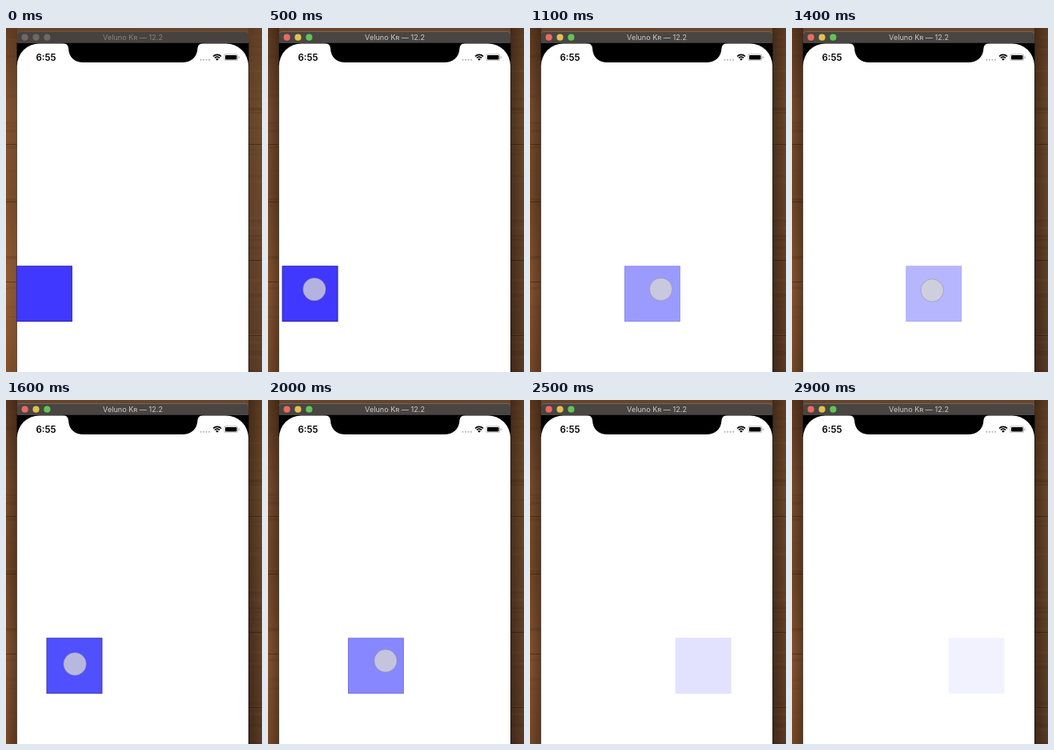
An HTML page with a canvas that plays this animation: 320x430 px, repeating every 3.6 s.

```html
<!DOCTYPE html>
<html lang="en">
<head>
<meta charset="utf-8">
<title>Drag to fade</title>
<style>
  html, body { margin: 0; width: 100%; height: 100%; overflow: hidden; }
  canvas { display: block; }
</style>
</head>
<body>
<canvas id="stage" width="320" height="430"></canvas>
<script>
const ctx = document.getElementById('stage').getContext('2d');
const LOOP = 3600, STEP = 100;
const TOUCH_START = 200, TOUCH_END = 2500;

// [time in ms, left edge of the square]
const path = [[0, 13], [300, 13], [600, 22], [900, 50.6], [1100, 118], [1260, 149],
  [1400, 142.3], [1500, 82], [1600, 50.6], [1740, 41], [1900, 63], [2000, 100],
  [2200, 162.3], [2400, 173], [2600, 189], [2900, 195.6], [3600, 195.6]];

const chord = i => i < 0 || i > path.length - 2 ? 0
  : (path[i + 1][1] - path[i][1]) / (path[i + 1][0] - path[i][0]);

function tangent(i) {
  const a = chord(i - 1), b = chord(i);
  return a * b <= 0 ? 0 : 2 * a * b / (a + b);
}

// Monotone cubic through the path points
function squareX(t) {
  t = Math.max(0, Math.min(LOOP - 1, t));
  const i = path.findIndex((p, k) => t < path[k + 1][0]);
  const [t0, x0] = path[i], [t1, x1] = path[i + 1];
  const h = t1 - t0, u = (t - t0) / h, v = 1 - u;
  return x0 * (1 + 2 * u) * v * v + x1 * u * u * (3 - 2 * u)
    + h * u * v * (tangent(i) * v - tangent(i + 1) * u);
}

function rect(x, y, w, h, color) {
  ctx.fillStyle = color;
  ctx.fillRect(x, y, w, h);
}

function disc(x, y, r, color) {
  ctx.fillStyle = color;
  ctx.beginPath();
  ctx.arc(x, y, r, 0, 7);
  ctx.fill();
}

function roundRect(x, y, w, h, r, color) {
  ctx.fillStyle = color;
  ctx.beginPath();
  ctx.roundRect(x, y, w, h, r);
  ctx.fill();
}

function text(str, x, y, font, color, align) {
  ctx.font = font;
  ctx.fillStyle = color;
  ctx.textAlign = align;
  ctx.fillText(str, x, y);
}

// Evenly spaced colour stops between two points
function gradient(x0, y0, x1, y1, colors) {
  const g = ctx.createLinearGradient(x0, y0, x1, y1);
  colors.forEach((color, i) => g.addColorStop(i / (colors.length - 1), color));
  return g;
}

function drawWood(active) {
  rect(0, 0, 160, 430, gradient(0, 0, 0, 430,
    ['#6a4226', '#8d5935', '#87542f', '#9c6339', '#8c5730']));
  rect(160, 0, 160, 430, gradient(0, 0, 0, 430,
    ['#6a4428', '#75502f', '#704b2f', '#6a462b', '#64412a']));

  let seed = 7;
  const random = () => (seed = seed * 16807 % 2147483647) / 2147483647;
  for (let i = 0; i < 70; i++) {
    const shade = random() < 0.6 ? '45,22,8' : '165,110,68';
    rect(random() < 0.5 ? 0 : 303, random() * 430, 17, 1 + random() * 3,
      `rgba(${shade},${0.03 + random() * 0.09})`);
  }
  for (const [x, y] of [[0, 145], [0, 217], [0, 317], [303, 145], [303, 290], [303, 384]]) {
    rect(x, y, 17, 1, 'rgba(40,20,8,.45)');
  }

  const depth = active ? 0.45 : 0.18;
  for (const [edge, far] of [[14, -10], [303, 327]]) {
    rect(Math.min(edge, far), 0, 24, 430, gradient(edge, 0, far, 0,
      [`rgba(20,10,4,${depth})`, 'rgba(20,10,4,0)']));
  }
}

function drawWindow(active) {
  rect(13.3, 18, 290.4, 412, '#1c1815');
  roundRect(14, 4, 289, 16, [4, 4, 0, 0], active ? '#6c6967' : '#5b5653');
  roundRect(14, 5, 289, 15, [4, 4, 0, 0], active ? '#484543' : '#48423f');
  const lights = active ? ['#ec6a5f', '#e3c04d', '#61c455'] : ['#6d6865', '#6d6865', '#6d6865'];
  lights.forEach((color, i) => disc(23.6 + 13.9 * i, 11.7, 4.1, color));
  text('Veluno Kʀ — 12.2', 158.5, 15.2, '9.1px Inter, sans-serif',
    active ? '#cbc8c6' : '#898481', 'center');
}

function drawScreen() {
  rect(14, 19, 289, 60, '#000');
  roundRect(13.8, 19.4, 289.2, 440, 28, '#fff');

  ctx.fillStyle = '#000';
  ctx.beginPath();
  ctx.moveTo(70, 18.8);
  ctx.quadraticCurveTo(77.5, 19.3, 78, 25);
  ctx.bezierCurveTo(78.5, 37, 86, 43, 97, 43);
  ctx.lineTo(220, 43);
  ctx.bezierCurveTo(231, 43, 239, 37, 239.5, 25);
  ctx.quadraticCurveTo(240, 19.3, 248, 18.8);
  ctx.fill();

  text('6:55', 37.5, 41, '600 11.5px Inter, sans-serif', '#000', 'left');
  for (let i = 0; i < 4; i++) disc(243.5 + 3.5 * i, 39.8, 1.1, '#b9b9b9');

  ctx.strokeStyle = '#000';
  ctx.lineWidth = 1.6;
  for (const r of [4.4, 7.1]) {
    ctx.beginPath();
    ctx.arc(264, 40.5, r, -Math.PI * 0.75, -Math.PI * 0.25);
    ctx.stroke();
  }
  ctx.beginPath();
  ctx.moveTo(264, 40.8);
  ctx.arc(264, 40.8, 2.7, -Math.PI * 0.75, -Math.PI * 0.25);
  ctx.fillStyle = '#000';
  ctx.fill();

  roundRect(272.5, 32.5, 17.5, 8.6, 2.4, '#a5a5a5');
  roundRect(273.2, 33.2, 16.1, 7.2, 1.9, '#fff');
  roundRect(274, 34, 14.5, 5.6, 1.3, '#000');
  roundRect(290.6, 35.3, 1.1, 3, 0.5, '#a5a5a5');
}

function drawSquare(x) {
  const tint = 80 + 1.117 * (x - 50.6);
  const opacity = Math.min(1, (255 - tint) / 197);
  rect(x, 297.3, 69.8, 69.8, `rgb(${Math.max(64, tint)},${Math.max(56, tint)},255)`);
  ctx.strokeStyle = `rgba(20,20,50,${0.5 * opacity ** 2})`;
  ctx.lineWidth = 0.9;
  ctx.strokeRect(x + 0.4, 297.7, 69, 69);
}

// The finger runs slightly ahead of the square it drags
function drawTouch(t, x) {
  const lead = (squareX(t + 100) - squareX(t - 100)) * 0.1;
  const y = 328 + 2 * Math.cos((t - 1600) / 800 * 2 * Math.PI);
  disc(x + 39.5 + lead, y, 14.2, 'rgba(212,212,215,.79)');
  ctx.strokeStyle = 'rgba(130,130,150,.45)';
  ctx.lineWidth = 1;
  ctx.stroke();
}

function draw(now) {
  const t = Math.floor(now % LOOP / STEP) * STEP;
  const active = t >= TOUCH_START;
  const x = squareX(t);
  drawWood(active);
  drawWindow(active);
  drawScreen();
  drawSquare(x);
  if (active && t < TOUCH_END) drawTouch(t, x);
}

const start = performance.now();
function tick() {
  draw(performance.now() - start);
  requestAnimationFrame(tick);
}
tick();
</script>
</body>
</html>
```
